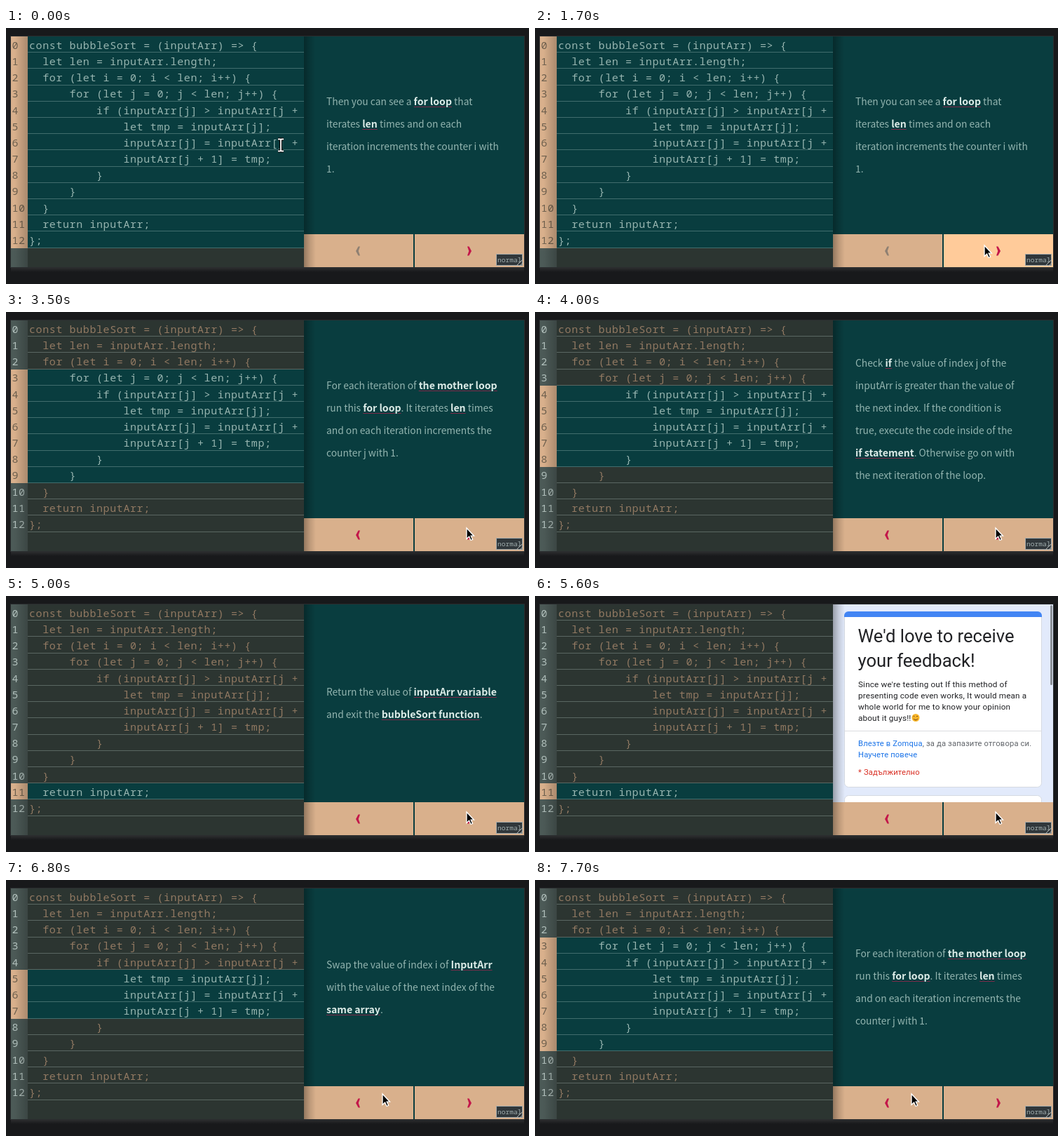
An HTML page for the animation above (8 s loop, 746 by 365 pixels).

```html
<!DOCTYPE html>
<html lang="en">
<head>
<meta charset="utf-8">
<title>Bubble sort walkthrough</title>
<style>
  html, body { margin: 0; width: 100%; height: 100%; overflow: hidden; background: #18191b; }
  svg { display: block; }
  .code text { font: 300 15px "Source Code Pro", "Noto Sans Mono", monospace; letter-spacing: .6px; }
  .row .bar { fill: #2c3531; }
  .row .gutter { fill: #4c5a57; }
  .row .num { fill: #b3c2be; }
  .row .line { fill: #917962; }
  .row.on .bar { fill: #093d3f; }
  .row.on .gutter { fill: #d9b08c; }
  .row.on .num { fill: #6f614f; }
  .row.on .line { fill: #97b5b0; }
  .note { height: 282px; display: flex; align-items: center; white-space: nowrap; color: #93b5b0;
    font: 300 13.8px/32px "Source Sans Pro", "Noto Sans CJK JP", "Noto Sans CJK SC", "Noto Sans CJK", sans-serif; }
  .note b { font-weight: 700; font-size: 14.1px; line-height: 1; color: #dcece8; text-decoration: underline 1px #7d2a49; text-underline-offset: 2px; }
  .form text { font-family: Roboto, sans-serif; fill: #202124; }
  .form .title { font-size: 25.6px; }
  .form .body { font-size: 11.73px; letter-spacing: .16px; }
  .form .small { font-size: 11.2px; letter-spacing: .16px; fill: #5f6368; }
  .form .link { fill: #1a73e8; }
  .form .must { fill: #d93025; }
</style>
</head>
<body>
<svg width="746" height="365" viewBox="0 0 746 365">
  <defs>
    <linearGradient id="edge"><stop stop-color="#000" stop-opacity=".32"/><stop offset=".5" stop-color="#000" stop-opacity=".13"/><stop offset="1" stop-color="#000" stop-opacity="0"/></linearGradient>
    <linearGradient id="inner"><stop offset=".2" stop-color="#000" stop-opacity="0"/><stop offset="1" stop-color="#000" stop-opacity=".22"/></linearGradient>
    <linearGradient id="under" x2="0" y2="1"><stop stop-color="#fff" stop-opacity=".1"/><stop offset="1" stop-color="#fff" stop-opacity="0"/></linearGradient>
    <clipPath id="frame"><rect x="425" y="12" width="314" height="282"/></clipPath>
    <clipPath id="tag"><rect x="700" y="323" width="36" height="16"/></clipPath>
  </defs>
  <rect width="746" height="365" fill="#18191b"/>
  <rect x="7" y="341" width="732" height="7" fill="url(#under)"/>
  <rect x="6.5" y="11.5" width="733" height="330" fill="#2c3531" stroke="#2a2d2f"/>
  <rect x="7" y="12" width="24" height="329" fill="#4c5a57"/>
  <g class="code" id="code"></g>
  <rect x="7" y="12" width="24" height="329" fill="url(#inner)"/>

  <rect x="425" y="12" width="314" height="329" fill="#093d3f"/>
  <foreignObject x="457" y="11" width="282" height="282"><div class="note"><div id="note"></div></div></foreignObject>

  <g class="form" id="form" clip-path="url(#frame)">
    <rect x="425" y="12" width="314" height="282" fill="#e2eafb"/>
    <rect x="441.5" y="22.5" width="281" height="250" rx="6" fill="#fff" stroke="#d5dae2"/>
    <path d="M441 30V28a6 6 0 0 1 6-6H717a6 6 0 0 1 6 6V30Z" fill="#4285f4"/>
    <text class="title" x="460.5" y="66">We'd love to receive</text>
    <text class="title" x="460.5" y="101">your feedback!</text>
    <text class="body" x="461" y="130">Since we're testing out If this method of</text>
    <text class="body" x="461" y="146">presenting code even works, It would mean a</text>
    <text class="body" x="461" y="162">whole world for me to know your opinion</text>
    <text class="body" x="461" y="178">about it guys!!</text>
    <circle cx="543" cy="173.5" r="5.5" fill="#f7b529"/>
    <path d="M539.5 172q1-1.5 2 0M544 172q1-1.5 2 0M540 175q3 3.5 6 0" fill="none" stroke="#74401c"/>
    <path d="M442 192.5H723" stroke="#dadce0"/>
    <text class="small" x="461" y="214"><tspan class="link">Влезте в Zomqua</tspan>, за да запазите отговора си.</text>
    <text class="small link" x="461" y="230" style="fill:#1a73e8">Научете повече</text>
    <text class="small must" x="461" y="255" style="fill:#d93025">* Задължително</text>
    <rect x="441.5" y="284.5" width="281" height="30" rx="6" fill="#fff" stroke="#d5dae2"/>
    <rect x="735" y="13" width="3" height="114" rx="1.5" fill="#8b9098"/>
  </g>

  <rect id="prev" x="425" y="294" width="156" height="47"/>
  <rect x="581" y="294" width="2" height="47" fill="#093d3f"/>
  <rect id="next" x="583" y="294" width="156" height="47"/>
  <path id="prevMark" d="M502.5 311.5H505L502.7 318L505 324.5H502.5L499 318Z"/>
  <path id="nextMark" d="M660.5 311.5H658L660.3 318L658 324.5H660.5L664 318Z" fill="#c3174a"/>
  <rect x="425" y="12" width="17" height="329" fill="url(#edge)"/>

  <rect x="699.5" y="322.5" width="37" height="16" fill="#30373b" stroke="#a3aaab"/>
  <text x="701" y="333.5" clip-path="url(#tag)" fill="#a3b0b0" style="font:300 9.6px 'Noto Sans Mono',monospace">normal</text>
  <path d="M727 340L738 329M732 340L738 334" stroke="#aeb3b3"/>

  <g id="cursor">
    <path id="arrow" d="M0 0V15.5L3.6 12.2L6 17.5L8.6 16.4L6.2 11.2H10.5Z" fill="#000" stroke="#fff" stroke-width="1.3"/>
    <g id="beam" fill="none">
      <path d="M-4 -8.5H-1L0 -7.5L1 -8.5H4M-4 8.5H-1L0 7.5L1 8.5H4M0 -7.5V7.5" stroke="#000" stroke-width="4"/>
      <path d="M-4 -8.5H-1L0 -7.5L1 -8.5H4M-4 8.5H-1L0 7.5L1 8.5H4M0 -7.5V7.5" stroke="#fff" stroke-width="1.8"/>
    </g>
  </g>
</svg>
<script>
const LOOP = 8000, STEP = 100, ROW = 23.2;
const $ = id => document.getElementById(id);

const code = [
  'const bubbleSort = (inputArr) => {',
  '  let len = inputArr.length;',
  '  for (let i = 0; i < len; i++) {',
  '      for (let j = 0; j < len; j++) {',
  '          if (inputArr[j] > inputArr[j +',
  '              let tmp = inputArr[j];',
  '              inputArr[j] = inputArr[j +',
  '              inputArr[j + 1] = tmp;',
  '          }',
  '      }',
  '  }',
  '  return inputArr;',
  '};'
];

const loopNote = 'Then you can see a <b>for loop</b> that<br>iterates <b>len</b> times and on each<br>iteration increments the counter i with<br>1.';

// Each slide: first and last highlighted line, explanation
const slides = {
  start: [0, 12, loopNote],
  len: [1, 1, 'First declare the variable <b>len</b> and<br>assign to it the length of the<br><b>inputArr</b> array.'],
  outer: [2, 10, loopNote],
  inner: [3, 9, 'For each iteration of <b>the mother loop</b><br>run this <b>for loop</b>. It iterates <b>len</b> times<br>and on each iteration increments the<br>counter j with 1.'],
  check: [4, 8, 'Check <b>if</b> the value of index j of the<br>inputArr is greater than the value of<br>the next index. If the condition is<br>true, execute the code inside of the<br><b>if statement</b>. Otherwise go on with<br>the next iteration of the loop.'],
  swap: [5, 7, 'Swap the value of index i of <b>InputArr</b><br>with the value of the next index of the<br><b>same array</b>.'],
  ret: [11, 11, 'Return the value of <b>inputArr variable</b><br>and exit the <b>bubbleSort function</b>.'],
  form: [11, 11, '']
};

const timeline = [
  [0, 'start'], [1800, 'len'], [2700, 'outer'], [3400, 'inner'], [4000, 'check'], [4500, 'swap'],
  [5000, 'ret'], [5500, 'form'], [6500, 'ret'], [6800, 'swap'], [7300, 'check'], [7700, 'inner']
];

const hovers = {
  next: [[1500, 1800], [3900, 4000], [5400, 5600]],
  prev: [[6300, 6500], [6700, 6800], [7200, 7300], [7600, 7700]]
};

// Pointer path: time, x, y
const path = [
  [100, 392, 167], [1000, 630, 289], [1100, 631, 291], [1200, 631, 291], [1300, 633, 292],
  [1400, 633, 292], [1500, 641, 310], [1900, 641, 310], [2200, 662, 306], [2300, 662, 306],
  [2400, 659, 306], [3000, 659, 306], [3100, 657, 306], [3200, 657, 306], [3400, 657, 308],
  [5700, 657, 308], [6100, 574, 306], [6200, 574, 306], [6400, 537, 305]
];

const escapeText = s => s.replace(/&/g, '&amp;').replace(/</g, '&lt;').replace(/>/g, '&gt;');
const rowTop = i => Math.round(12 + ROW * i);

$('code').innerHTML = code.map((line, i) => {
  const top = rowTop(i), height = rowTop(i + 1) - top, base = Math.round(29.7 + ROW * i);
  const indent = line.search(/\S/);
  return `<g class="row">
    <rect class="bar" x="31" y="${top}" width="394" height="${height}"/>
    <rect class="gutter" x="7" y="${top}" width="24" height="${height}"/>
    <rect x="31" y="${top + height - 1}" width="394" height="1" fill="#d1e8e2" opacity=".28"/>
    <text class="num" x="8.5" y="${base}">${i}</text>
    <text class="line" x="${33 + 9.6 * indent}" y="${base}">${escapeText(line.trim())}</text>
  </g>`;
}).join('');
const rows = [...document.querySelectorAll('.row')];

function pointerAt(t) {
  const n = path.findIndex(p => p[0] > t);
  if (n === 0) return path[0].slice(1);
  if (n < 0) return path[path.length - 1].slice(1);
  const [t0, x0, y0] = path[n - 1], [t1, x1, y1] = path[n];
  const k = (t - t0) / (t1 - t0);
  return [x0 + (x1 - x0) * k, y0 + (y1 - y0) * k];
}

let shown;
function showSlide(name) {
  if (name === shown) return;
  shown = name;
  const [first, last, text] = slides[name];
  const isForm = name === 'form';
  rows.forEach((row, i) => row.classList.toggle('on', i >= first && i <= last));
  $('note').innerHTML = text;
  $('form').style.display = isForm ? '' : 'none';
  $('nextMark').style.display = isForm ? 'none' : '';
  $('prevMark').setAttribute('fill', name === 'start' ? '#8f8072' : '#c3174a');
}

function render(t) {
  showSlide(timeline.filter(([at]) => at <= t).pop()[1]);
  for (const id in hovers) {
    const lit = hovers[id].some(([from, to]) => t >= from && t < to);
    $(id).setAttribute('fill', lit ? '#ffcb9a' : '#d9b08c');
  }
  const [x, y] = pointerAt(t);
  const overCode = x < 425;
  $('cursor').setAttribute('transform', `translate(${Math.round(x)} ${Math.round(y)})`);
  $('arrow').style.display = overCode ? 'none' : '';
  $('beam').style.display = overCode ? '' : 'none';
}

const begin = performance.now();
function tick() {
  const t = (performance.now() - begin) % LOOP;
  render(Math.floor(t / STEP) * STEP);
  requestAnimationFrame(tick);
}
tick();
</script>
</body>
</html>
```
